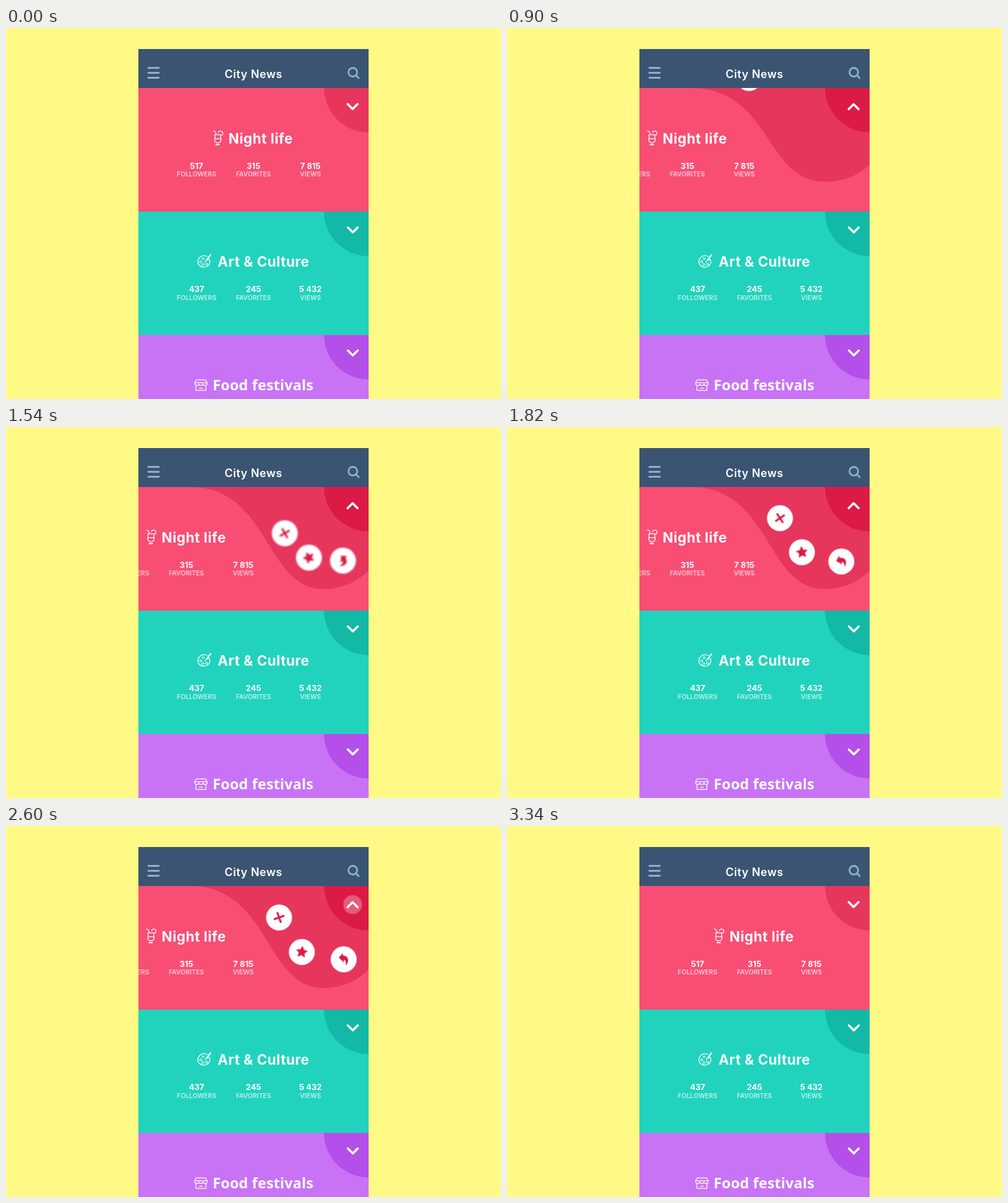
An HTML page that plays this animation: 800x600 px, repeating every 4920 ms.

```html
<!DOCTYPE html>
<html lang="en">
<head>
<meta charset="utf-8">
<title>City News</title>
<style>
  html, body { margin: 0; width: 100%; height: 100%; overflow: hidden; background: #fff985; }
  svg { display: block; width: 100%; height: 100%; }
  text { fill: #fff; font-family: Inter, sans-serif; }
  .bar-title { font-size: 18px; font-weight: 600; letter-spacing: .5px; text-anchor: middle; }
  .title { font-size: 22.5px; font-weight: 700; letter-spacing: .5px; }
  .humanist { font: 700 23.5px "Noto Sans", "Open Sans", sans-serif; letter-spacing: .1px; }
  .stats { text-anchor: middle; }
  .count { font-size: 13px; font-weight: 700; }
  .label { font-size: 10.4px; font-weight: 600; opacity: .7; }
  .icon { fill: none; stroke: #fff; stroke-width: 1.25; stroke-linecap: round; stroke-linejoin: round; }
  .tool { fill: none; stroke: #8fafd2; stroke-width: 2.8; stroke-linecap: round; }
  .chevron { fill: none; stroke: #fff; stroke-width: 3.5; stroke-linecap: round; stroke-linejoin: round; }

  /* One shared 4920 ms clock: 1% = 49.2 ms */
  .move { animation: 4920ms linear infinite; }
  .tap { animation-name: tap; opacity: 0; }
  .title-row { animation-name: title, title-blur; }
  .stats-row { animation-name: stats, stats-blur; }
  .blob { animation-name: blob; }
  .corner { animation-name: corner; }
  .flip { animation-name: flip; }
  .button {
    animation-name: ride, soften;
    offset-path: path("M221.3 -10.1 L360 62 C405 85 430 112 442 150 C447 176 478 217 518 220 C538 221.5 556 213 574 198");
    offset-rotate: 0deg;
  }
  .button g { animation-name: spin; fill: #db1b45; }
  .add   { --enter: 0px;   --peak: 340px; --back: 268px; --swing: 282px; --rest: 278px; --exit: 100px; --spin: 80deg; }
  .star  { --enter: 50px;  --peak: 386px; --back: 334px; --swing: 349px; --rest: 346px; --exit: 104px; --spin: 40deg; }
  .share { --enter: 100px; --peak: 442px; --back: 392px; --swing: 422px; --rest: 418px; --exit: 120px; --spin: 50deg; }

  @keyframes tap {
    0%, 2.64% { opacity: 0; transform: scale(1.27); }
    4.065%, 9.756% { opacity: .58; transform: scale(1); }
    10.976%, 48.98% { opacity: 0; transform: scale(1.27); }
    50.407%, 52.033% { opacity: .58; transform: scale(1); }
    53.659%, 100% { opacity: 0; transform: scale(1.27); }
  }
  @keyframes title {
    0%, 8.13% { transform: none; animation-timing-function: ease-in-out; }
    16.26%, 58.333% { transform: translateX(-108px); animation-timing-function: ease-in-out; }
    67.68%, 100% { transform: none; }
  }
  @keyframes stats {
    0%, 9.553% { transform: none; animation-timing-function: ease-in-out; }
    17.683%, 56.911% { transform: translateX(-108.5px); animation-timing-function: ease-in-out; }
    64.634%, 100% { transform: none; }
  }
  @keyframes title-blur {
    0%, 15.2%, 66% { filter: none; animation-timing-function: step-end; }
    9.2%, 59.6% { filter: url(#sweep); animation-timing-function: step-end; }
    100% { filter: none; }
  }
  @keyframes stats-blur {
    0%, 16.6%, 63.4% { filter: none; animation-timing-function: step-end; }
    10.8%, 58.4% { filter: url(#sweep); animation-timing-function: step-end; }
    100% { filter: none; }
  }
  @keyframes blob {
    0%, 8.537% { transform: scaleY(0); animation-timing-function: ease-in-out; }
    20.732%, 56% { transform: none; animation-timing-function: ease-in-out; }
    65.75%, 100% { transform: scaleY(0); }
  }
  @keyframes corner {
    0%, 8.943%, 60.976%, 100% { fill: #e6365c; }
    16.26%, 55.285% { fill: #db1b45; }
  }
  @keyframes flip {
    0%, 10.163%, 60.569%, 100% { d: path("M-8 -4 L0 4 L8 -4"); }
    13.008%, 56.6% { d: path("M-10 -2 L0 -2 L10 -2"); }
    15.854%, 55.285% { d: path("M-8 4.3 L0 -3.7 L8 4.3"); }
  }
  @keyframes ride {
    0%, 15.854% { offset-distance: var(--enter); animation-timing-function: cubic-bezier(.33, .4, .6, 1); }
    28.049% { offset-distance: var(--peak); animation-timing-function: ease-in-out; }
    34.553% { offset-distance: var(--back); animation-timing-function: ease-in-out; }
    38.618% { offset-distance: var(--swing); animation-timing-function: ease-in-out; }
    43.089%, 53.862% { offset-distance: var(--rest); animation-timing-function: ease-in-out; }
    61.22%, 100% { offset-distance: var(--exit); }
  }
  @keyframes spin {
    0%, 15.854% { transform: rotate(-120deg); }
    28.049% { transform: rotate(calc(var(--spin) * 1.3)); }
    31.301% { transform: rotate(var(--spin)); }
    36% { transform: rotate(-15deg); animation-timing-function: ease-in-out; }
    43.089%, 53.862% { transform: none; animation-timing-function: ease-in-out; }
    61.22%, 100% { transform: rotate(-130deg); }
  }
  @keyframes soften {
    0%, 18.293%, 41%, 53.862%, 62%, 100% { filter: blur(0); }
    20.5%, 31.5%, 56.5%, 60% { filter: blur(1.3px); }
    36% { filter: blur(.7px); }
  }
</style>
</head>
<body>
<svg viewBox="0 0 800 600">
  <defs>
    <filter id="sweep" x="-10%" width="120%"><feGaussianBlur stdDeviation="2 0"/></filter>
    <clipPath id="night"><rect x="214" y="97" width="372" height="200"/></clipPath>
    <clipPath id="screen"><rect x="214" y="34" width="372" height="566"/></clipPath>
  </defs>
  <rect width="800" height="600" fill="#fff985"/>

  <g clip-path="url(#night)">
    <rect x="214" y="97" width="372" height="200" fill="#f84e74"/>
    <g transform="translate(0 97)">
      <path class="move blob" fill="#e6365c" d="M297 0 C427 0 418 165 513 165 C545 165 570 152 586 135 V0Z"/>
    </g>
    <circle class="move corner" cx="586" cy="97" r="72" fill="#e6365c"/>

    <g class="move title-row">
      <g class="icon">
        <path d="M335 166.5l3 1.2 2 5M337 172.5h10.5q-1.5 3.5 0 7q.5 6-5.2 6t-5.2-6q1.5-3.5 0-7zM337 179h10.5M343 169.5a3.8 3.8 0 1 1 6 4"/>
        <path d="M339.5 188.5h5" stroke-width="2"/>
      </g>
      <text class="title" x="359.5" y="187">Night life</text>
    </g>
    <g class="move stats-row stats">
      <text class="count" x="308" y="227.5">517</text><text class="label" x="308" y="240">FOLLOWERS</text>
      <text class="count" x="400" y="227.5">315</text><text class="label" x="400" y="240">FAVORITES</text>
      <text class="count" x="492" y="227.5">7 815</text><text class="label" x="492" y="240">VIEWS</text>
    </g>

    <g class="move button add">
      <circle r="21" fill="#fff"/>
      <g class="move"><path d="M-8.5 3L8.5-3M-3-8.5L3 8.5" stroke="#db1b45" stroke-width="3.2"/></g>
    </g>
    <g class="move button star">
      <circle r="21" fill="#fff"/>
      <g class="move">
        <path transform="rotate(8)" stroke="#db1b45" stroke-linejoin="round" d="M0-9L2.7-3.3 8.8-2.6 4.3 1.6 5.4 7.6 0 4.7-5.4 7.6-4.3 1.6-8.8-2.6-2.7-3.3Z"/>
      </g>
    </g>
    <g class="move button share">
      <circle r="21" fill="#fff"/>
      <g class="move"><path d="M-8-3L-1-10L-1-6C8-6 10 4 3 10C4 4 3 1 0 1L0 5Z"/></g>
    </g>

    <g transform="translate(560.2 127)">
      <circle class="move tap" r="13.3" fill="#fff"/>
      <path class="move flip chevron" d="M-8 -4 L0 4 L8 -4"/>
    </g>
  </g>

  <g clip-path="url(#screen)">
    <rect x="214" y="297" width="372" height="200" fill="#21d3bd"/>
    <path d="M514 297A72 72 0 0 0 586 369V297Z" fill="#12b9a7"/>
    <path class="chevron" transform="translate(560.5 326.5)" d="M-8-4L0 4L8-4"/>
    <g class="icon">
      <path d="M325 369.5q-7-3.5-12 1.5-5.5 6.5-1 12.5 5.500 5.500 13 2 6-4 4-10.5-2-1.500-4 .5"/>
      <path d="M330.5 367l-6 8" stroke-width="2.4"/>
      <path d="M324 375l-2.5 3.5"/>
      <g stroke-width="1"><circle cx="314.5" cy="378" r="1.7"/><circle cx="318" cy="382.5" r="1.7"/><circle cx="324" cy="382" r="1.7"/><circle cx="318.5" cy="373" r="1.5"/></g>
    </g>
    <text class="title" x="342" y="386">Art &amp; Culture</text>
    <g class="stats">
      <text class="count" x="308" y="427">437</text><text class="label" x="308" y="439.5">FOLLOWERS</text>
      <text class="count" x="400" y="427">245</text><text class="label" x="400" y="439.5">FAVORITES</text>
      <text class="count" x="492" y="427">5 432</text><text class="label" x="492" y="439.5">VIEWS</text>
    </g>

    <rect x="214" y="496.5" width="372" height="104" fill="#c873f5"/>
    <path d="M514 496.5A72 72 0 0 0 586 568.5V496.5Z" fill="#b44fe9"/>
    <path class="chevron" transform="translate(560.5 525.5)" d="M-8-4L0 4L8-4"/>
    <path class="icon" d="M307.5 569h15l2.5 4.5v2a3.3 2.5 0 0 1-6.6 0 3.3 2.5 0 0 1-6.8 0 3.3 2.5 0 0 1-6.6 0v-2zM305 573.5h20M307 578.5v7.5h16v-7.5M312.5 582.5h5"/>
    <text class="title humanist" x="334" y="586">Food festivals</text>

    <rect x="214" y="34" width="372" height="63" fill="#3a5472"/>
    <path class="tool" d="M230 64.5h17M230 72.5h17M230 80.5h17"/>
    <circle class="tool" cx="560.5" cy="71.5" r="7"/>
    <path class="tool" d="M566 77l4 4"/>
    <text class="bar-title" x="400" y="80.5">City News</text>
  </g>
</svg>
</body>
</html>
```
